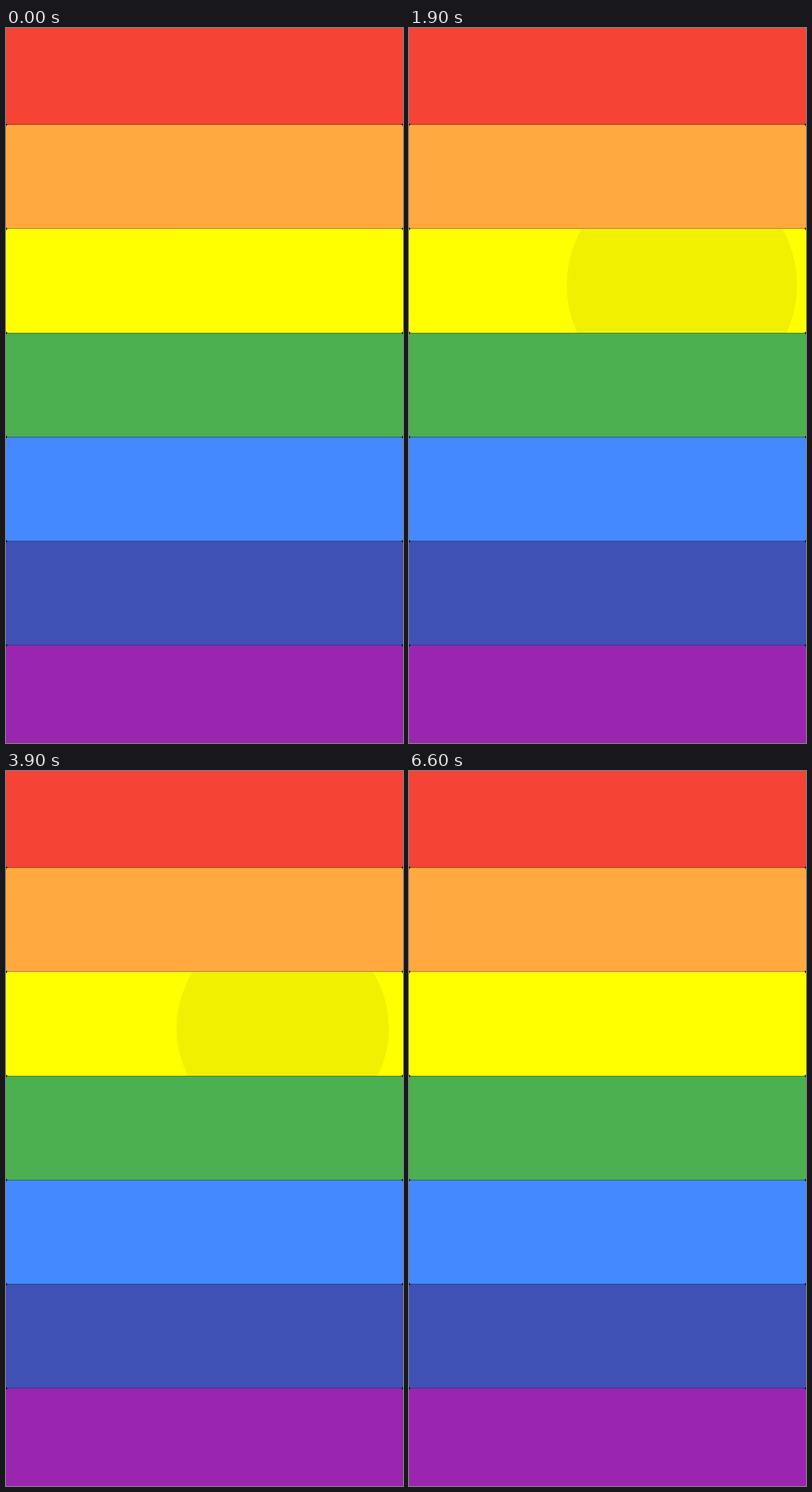
Recreate the animation shown at these times as an HTML page. Size 558 px wide and 1004 px high, loop 7300 ms.

```html
<!DOCTYPE html>
<html lang="en">
<head>
<meta charset="utf-8">
<title>Rainbow bars</title>
<style>
  html, body { margin: 0; width: 100%; height: 100%; overflow: hidden; background: #000; }
  svg { display: block; width: 100%; height: 100%; }
</style>
</head>
<body>
<svg id="stage" viewBox="0 0 558 1004" preserveAspectRatio="none"></svg>
<script>
const LOOP = 7300, STEP = 100;
const WIDTH = 558, PITCH = 146.25, TOP = -10.6, GAP = 0.25;
const COLORS = ['#f54336', '#ffa940', '#ffff00', '#4caf50', '#4489ff', '#3f51b5', '#9a25ae'];
const LAST = COLORS.length - 1;

// A finger taps every bar upwards, then back down; taps between keys are interpolated.
const KEYS = [
  { tap: 0, start: 400, x: 216 },
  { tap: 3, start: 1460, x: 367 },
  { tap: 5, start: 2050, x: 400 },
  { tap: 6, start: 2700, x: 484 },
  { tap: 7, start: 3190, x: 437 },
  { tap: 8, start: 3770, x: 389 },
  { tap: 12, start: 5150, x: 359 }
];

const stage = document.getElementById('stage');
const clamp = v => Math.max(0, Math.min(1, v));
const mix = (a, b, k) => a + (b - a) * k;
const barTop = i => TOP + i * PITCH;

function add(parent, tag, attrs) {
  const node = document.createElementNS('http://www.w3.org/2000/svg', tag);
  for (const key in attrs) node.setAttribute(key, attrs[key]);
  return parent.appendChild(node);
}

function addCard(parent, i, fill) {
  add(parent, 'rect', {
    x: 0, y: barTop(i) + GAP / 2, width: WIDTH, height: PITCH - GAP, rx: 3, fill
  });
}

const defs = add(stage, 'defs', {});
const bars = COLORS.map((color, i) => {
  addCard(add(defs, 'clipPath', { id: 'bar' + i }), i, '#000');
  addCard(stage, i, color);
  return add(stage, 'g', { 'clip-path': `url(#bar${i})` });
});

function makeRipple(tap) {
  const next = Math.max(1, KEYS.findIndex(key => key.tap >= tap));
  const a = KEYS[next - 1], b = KEYS[next];
  const k = (tap - a.tap) / (b.tap - a.tap);
  const bar = Math.abs(LAST - tap);
  const node = add(bars[bar], 'circle', {
    cx: mix(a.x, b.x, k), cy: barTop(bar) + PITCH / 2 + 6, r: 0, 'fill-opacity': 0
  });
  return { node, start: mix(a.start, b.start, k) };
}

const ripples = Array.from({ length: 2 * LAST + 1 }, (_, tap) => makeRipple(tap));

function draw(time) {
  for (const { start, node } of ripples) {
    const age = time - start;
    const fadeIn = clamp(age / 75), fadeOut = clamp((275 - age) / 75);
    node.setAttribute('r', 40 + 0.84 * Math.max(0, Math.min(age, 275)));
    node.setAttribute('fill-opacity', 0.06 * fadeIn * fadeOut);
  }
}

const origin = performance.now();
function tick() {
  const time = (performance.now() - origin) % LOOP;
  draw(Math.floor(time / STEP) * STEP);
  requestAnimationFrame(tick);
}
draw(0);
requestAnimationFrame(tick);
</script>
</body>
</html>
```
